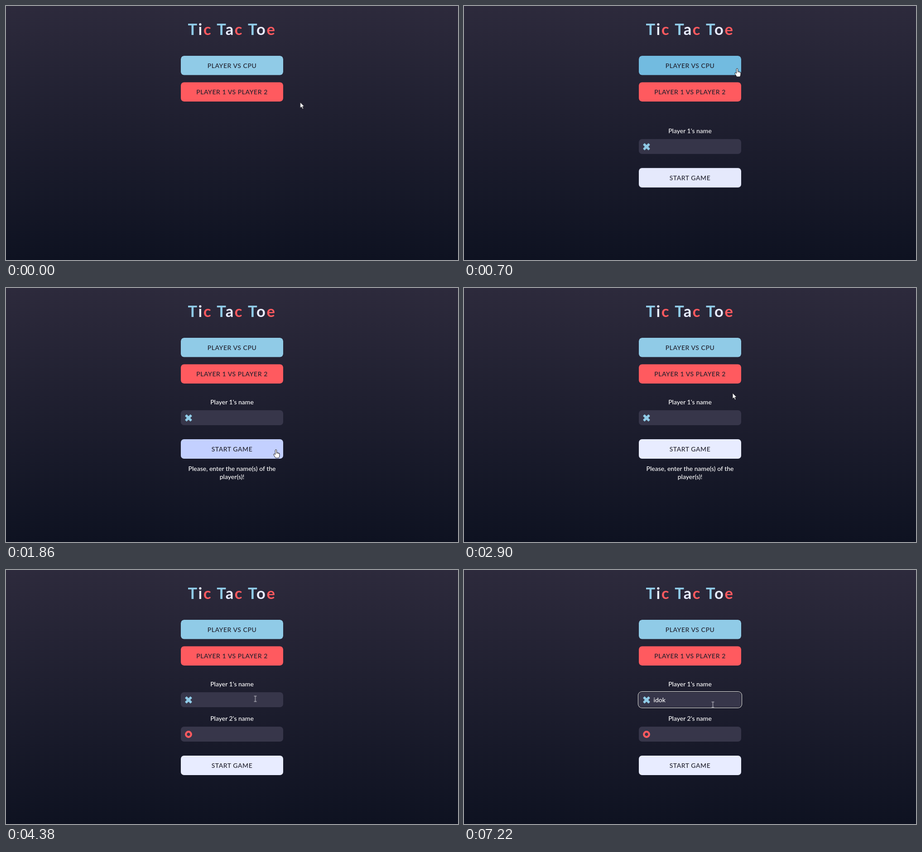
Write an HTML page that moves like this. It is 998 px wide and 561 px high and loops after 7.35 s.

```html
<!DOCTYPE html>
<html lang="en">
<head>
<meta charset="utf-8">
<title>Tic Tac Toe</title>
<style>
:root {
  --blue: #90cbe7; --blue-hover: #72bbe0;
  --red: #ff5a5f; --red-hover: #e65055;
  --pale: #e8ecff; --pale-hover: #c3d0ff;
  --loop: 7350ms;
}
html, body { margin: 0; width: 100%; height: 100%; overflow: hidden; }
body {
  position: relative;
  background: linear-gradient(#2d2a3c, #0e1221);
  font: 500 14px/18px Lato, "Open Sans", sans-serif;
  color: #fff;
}
h1, .btn, .label, .field, .note {
  position: absolute; left: 386px; width: 226px; margin: 0; text-align: center;
}
h1 { top: 26px; font-size: 34.5px; line-height: 50px; font-weight: 700; letter-spacing: 2.6px; white-space: nowrap; }
.x { color: var(--blue); }
.p { color: var(--pale); }
.o { color: var(--red); }

.btn { height: 43px; line-height: 43px; border-radius: 7px; letter-spacing: .55px; color: #20202c; }
.cpu { top: 110px; clip-path: inset(0 0 .4px round 7px); animation: cpu var(--loop) infinite; }
.duo { top: 168px; clip-path: inset(.4px 0 0 round 7px); animation: duo var(--loop) infinite; }
.start { animation: start var(--loop) infinite, drop var(--loop) step-end infinite; }

.form { position: absolute; inset: 0; animation: slide var(--loop) linear infinite; }
.label { top: 242.5px; }
.field {
  top: 270px; height: 33px; box-sizing: border-box; padding-left: 32.5px;
  border-radius: 7px; background: #37364a;
  display: flex; align-items: center;
}
.field svg { position: absolute; left: 9px; top: 8.5px; width: 16px; height: 16px; overflow: visible; }
.first { animation: focus var(--loop) step-end infinite; }
.second { position: absolute; top: 76px; left: 0; animation: second var(--loop) step-end infinite; }
.note { top: 390px; animation: note var(--loop) step-end infinite; }
.typed { white-space: nowrap; line-height: 18px; }
.typed span { font-size: 0; animation: var(--loop) step-end infinite; }
.typed span:nth-child(1) { animation-name: key1; }
.typed span:nth-child(2) { animation-name: key2; }
.typed span:nth-child(3) { animation-name: key3; }
.typed span:nth-child(4) { animation-name: key4; }
.caret { width: 1px; height: 18px; background: #fff; animation: caret var(--loop) step-end infinite; }

.cursor { position: absolute; left: 0; top: 0; width: 1px; height: 1px; overflow: visible; animation: move var(--loop) linear infinite; }
.cursor g { fill: #fff; stroke: #14141c; stroke-linejoin: round; animation: var(--loop) step-end infinite; }
.cursor .arrow { animation-name: arrow; }
.cursor .hand { animation-name: hand; }
.cursor .beam { fill: none; stroke: #d8d8de; animation-name: beam; }

/* Hover fades */
@keyframes cpu {
  0%, 5.78% { background: var(--blue); }
  8.5%, 11.84% { background: var(--blue-hover); }
  14.56%, 100% { background: var(--blue); }
}
@keyframes duo {
  0%, 40.61% { background: var(--red); }
  43.33%, 55.71% { background: var(--red-hover); }
  58.43%, 100% { background: var(--red); }
}
@keyframes start {
  0%, 19.05% { background: var(--pale); }
  21.77%, 34.97% { background: var(--pale-hover); }
  37.69%, 100% { background: var(--pale); }
}

/* Form */
@keyframes slide {
  0%, 8.7% { opacity: 0; transform: translateY(38px); }
  8.71% { opacity: .85; transform: translateY(38px); }
  9.52% { opacity: .99; transform: translateY(24px); }
  10.34% { opacity: 1; transform: translateY(13px); }
  11.16% { transform: translateY(5px); }
  12.24%, 100% { opacity: 1; transform: none; }
}
@keyframes drop { 0% { top: 334px; } 50.2%, 100% { top: 410px; } }
@keyframes second { 0% { opacity: 0; } 50.2%, 100% { opacity: 1; } }
@keyframes note { 0% { opacity: 0; } 24.9% { opacity: 1; } 50.2%, 100% { opacity: 0; } }
@keyframes focus {
  0% { box-shadow: none; }
  69.25%, 100% { box-shadow: 0 0 0 1px #11111a, 0 0 0 2px #fff; }
}
@keyframes caret {
  0% { opacity: 0; }
  69.25% { opacity: 1; }
  75.9% { opacity: 0; }
  82.85% { opacity: 1; }
  96.05%, 100% { opacity: 0; }
}
@keyframes key1 { 0% { font-size: 0; } 82.85%, 100% { font-size: 14px; } }
@keyframes key2 { 0% { font-size: 0; } 85.98%, 100% { font-size: 14px; } }
@keyframes key3 { 0% { font-size: 0; } 88.29%, 100% { font-size: 14px; } }
@keyframes key4 { 0% { font-size: 0; } 89.11%, 100% { font-size: 14px; } }

/* Pointer: path of the hotspot, then the shape shown */
@keyframes move {
  0%, .3% { transform: translate(649.5px, 212.5px); }
  3.4% { transform: translate(628px, 180px); }
  5.85% { transform: translate(611px, 146px); }
  7.62%, 10.6% { transform: translate(603px, 138px); }
  11.84% { transform: translate(613px, 170px); }
  13.19% { transform: translate(624px, 217px); }
  14.42% { transform: translate(628px, 240px); }
  17% { transform: translate(620px, 300px); }
  19.45% { transform: translate(606px, 338px); }
  20.68% { transform: translate(600px, 350px); }
  23.13%, 33.15% { transform: translate(596px, 357px); }
  34.83% { transform: translate(600px, 336px); }
  36.05% { transform: translate(601px, 320px); }
  37.55% { transform: translate(598px, 285px); }
  39.46% { transform: translate(593px, 232px); }
  40.82% { transform: translate(588px, 208px); }
  42.86% { transform: translate(585px, 189px); }
  45.3%, 47.88% { transform: translate(585px, 186px); }
  47.89%, 50.19% { transform: translate(584px, 181px); }
  50.2%, 53.4% { transform: translate(584px, 190px); }
  55.78% { transform: translate(580px, 212px); }
  57.55% { transform: translate(566px, 245px); }
  59.59%, 70.5% { transform: translate(550.5px, 284.5px); }
  70.6%, 73.4% { transform: translate(550.5px, 286.5px); }
  75.9%, 98.22% { transform: translate(550.5px, 297.5px); }
  98.23%, 100% { transform: translate(549.5px, 297.5px); }
}
@keyframes arrow {
  0%, 11.84%, 34.97%, 38.1%, 55.71% { opacity: 1; }
  5.78%, 19.05%, 36.87%, 40.61%, 58.84%, 100% { opacity: 0; }
}
@keyframes hand {
  0%, 11.84%, 34.97%, 55.71%, 100% { opacity: 0; }
  5.78%, 19.05%, 40.61% { opacity: 1; }
}
@keyframes beam {
  0%, 38.1% { opacity: 0; }
  36.87%, 58.84%, 100% { opacity: 1; }
}
</style>
</head>
<body>
<h1><span class="x">T</span><span class="p">i</span><span class="o">c</span> <span class="x">T</span><span class="p">a</span><span class="o">c</span> <span class="x">T</span><span class="p">o</span><span class="o">e</span></h1>
<div class="btn cpu">PLAYER VS CPU</div>
<div class="btn duo">PLAYER 1 VS PLAYER 2</div>

<div class="form">
  <div class="label">Player 1's name</div>
  <div class="field first">
    <svg viewBox="-8 -8 16 16" fill="#90cbe7">
      <rect x="-8.75" y="-2.8" width="17.5" height="5.6" rx="1.5" transform="rotate(45)"/>
      <rect x="-8.75" y="-2.8" width="17.5" height="5.6" rx="1.5" transform="rotate(-45)"/>
    </svg>
    <div class="typed"><span>i</span><span>d</span><span>o</span><span>k</span></div>
    <div class="caret"></div>
  </div>
  <div class="second">
    <div class="label">Player 2's name</div>
    <div class="field">
      <svg viewBox="-8 -8 16 16"><circle r="5.8" fill="none" stroke="#ff5a5f" stroke-width="4.2"/></svg>
    </div>
  </div>
  <div class="btn start">START GAME</div>
  <div class="note">Please, enter the name(s) of the<br>player(s)!</div>
</div>

<svg class="cursor">
  <g class="arrow"><path d="M0 0V13L3 10.3 5.2 15.2 7.4 14.2 5.3 9.5H9.2Z"/></g>
  <g class="hand">
    <path d="M-1.6 11V1.6A1.6 1.6 0 0 1 1.6 1.6V6.4Q3.4 5.6 4.2 7 5.8 6.4 6.4 7.8 8 7.6 8 9.4V13Q8 16.2 6.2 18.3H-.8Q-2.6 15.4 -5 11.4 -5.4 9.4 -3.6 9.4 -2.4 9.6 -1.6 11Z"/>
    <path d="M1.6 6.4V9M4.2 7V9.4M6.4 7.8V9.8" fill="none" stroke-width=".8"/>
  </g>
  <g class="beam"><path d="M-3 -6H3M0 -6V6M-3 6H3"/></g>
</svg>
</body>
</html>
```
